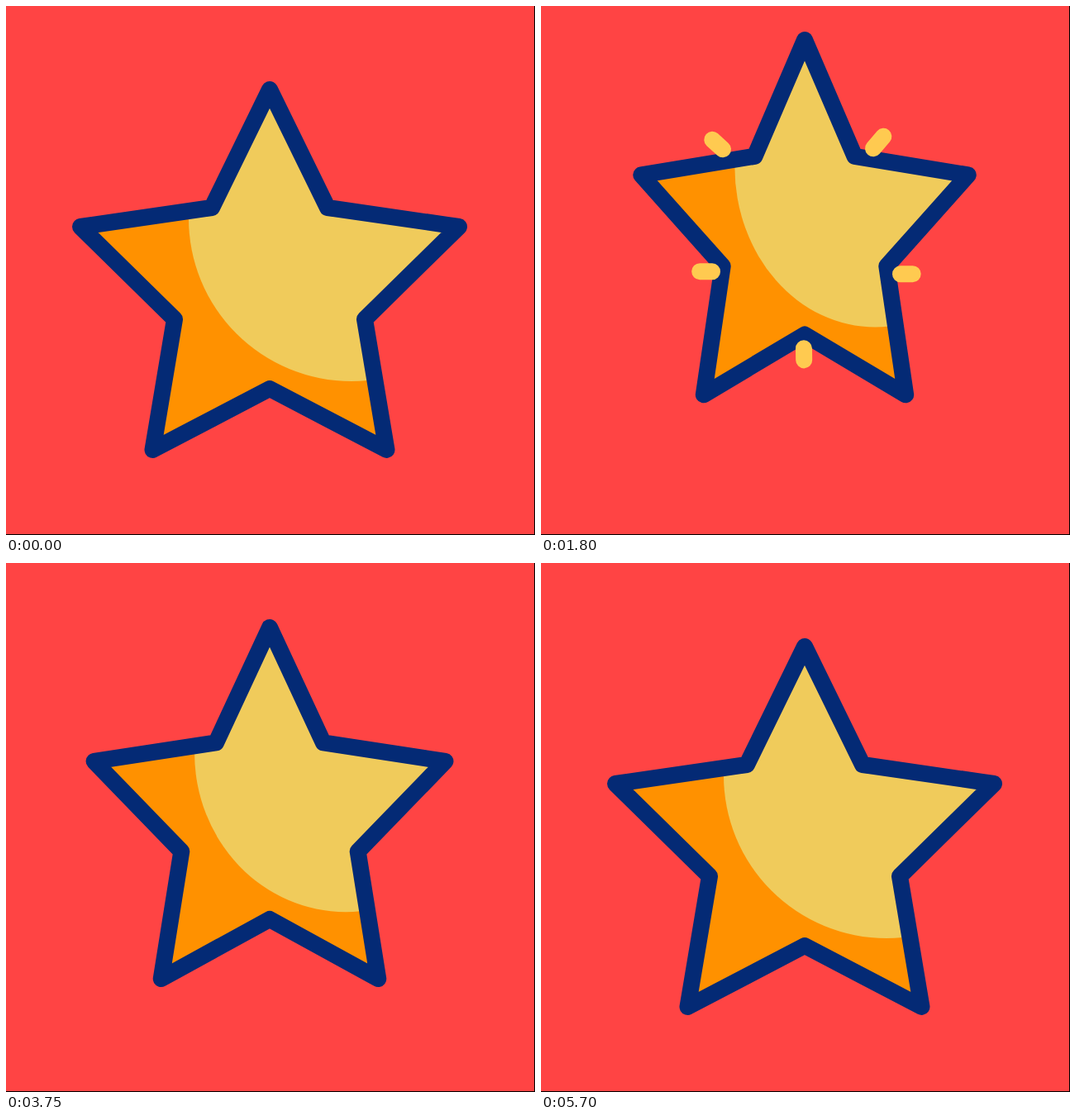
An HTML page for the animation above (5.85 s loop, 640 by 640 pixels).

```html
<!DOCTYPE html>
<html lang="en">
<head>
<meta charset="utf-8">
<title>Jumping star</title>
<style>
  html, body { margin: 0; width: 100%; height: 100%; overflow: hidden; background: #ff4444; }
  svg { display: block; width: 100vw; height: 100vh; }
  #outline { fill: none; stroke: #042a75; stroke-width: 20; stroke-linejoin: round; vector-effect: non-scaling-stroke; }
  #rays { stroke: #ffca50; stroke-width: 20; stroke-linecap: round; }
</style>
</head>
<body>
<svg viewBox="0 0 640 640">
  <defs>
    <path id="shape" d="M319 101 389 244 548 267 434 379 460.5 537 319 463 177.5 537 204 379 90 267 249 244Z"/>
    <clipPath id="inside"><use href="#shape"/></clipPath>
  </defs>
  <rect width="640" height="640" fill="#ff4444"/>
  <g id="star">
    <g clip-path="url(#inside)">
      <rect width="640" height="640" fill="#ff9100"/>
      <circle cx="418" cy="257" r="197" fill="#f0cb5b"/>
    </g>
    <path id="outline"/>
  </g>
  <g id="rays"></g>
  <path d="M639 0h1v640H0v-1h639z" fill="#000"/>
</svg>
<script>
const LOOP = 5850, STEP = 150;
const $ = id => document.getElementById(id);
const star = $('star'), rays = $('rays');
$('outline').setAttribute('d', $('shape').getAttribute('d'));

// Poses: lift of the feet, horizontal scale, vertical scale
const REST = [0, 1, 1];
const HIGH = [-76, 0.831, 1];
const SQUASH = [0, 1.096, 0.876];
const HOP = [-45, 0.873, 1.007];

// Moves: start, end, pose reached
const MOVES = [
  [110, 1250, HIGH],
  [1500, 2870, SQUASH],
  [3100, 4060, HOP],
  [4360, 5280, REST]
];

// Rays: inner start and full travel, relative to the resting star
const RAYS = [
  [220, 240, -98, -89],
  [402, 239, 95, -112],
  [207, 388, -114, -1],
  [435, 391, 113, -1],
  [318, 481, 1.5, 108]
].map(ray => {
  const line = document.createElementNS('http://www.w3.org/2000/svg', 'line');
  rays.append(line);
  return { line, ray };
});

function ease(t, from, to) {
  const x = Math.min(1, Math.max(0, (t - from) / (to - from)));
  return x * x * (3 - 2 * x);
}

function poseAt(t) {
  let pose = REST;
  for (const [from, to, next] of MOVES) {
    const k = ease(t, from, to);
    pose = pose.map((v, i) => v + (next[i] - v) * k);
  }
  return pose;
}

function draw(t) {
  const [lift, sx, sy] = poseAt(t);
  star.setAttribute('transform',
    `translate(319 ${537 + lift}) scale(${sx} ${sy}) translate(-319 -537)`);

  const tail = ease(t, 2100, 3050), head = ease(t, 1521, 2756);
  rays.style.display = head - tail > 0.01 ? '' : 'none';
  rays.setAttribute('transform', `translate(0 ${lift})`);
  for (const { line, ray: [x, y, dx, dy] } of RAYS) {
    line.setAttribute('x1', x + dx * tail);
    line.setAttribute('y1', y + dy * tail);
    line.setAttribute('x2', x + dx * head);
    line.setAttribute('y2', y + dy * head);
  }
}

const begin = performance.now();
function tick() {
  const t = (performance.now() - begin) % LOOP;
  draw(Math.floor(t / STEP) * STEP);
  requestAnimationFrame(tick);
}
tick();
</script>
</body>
</html>
```
